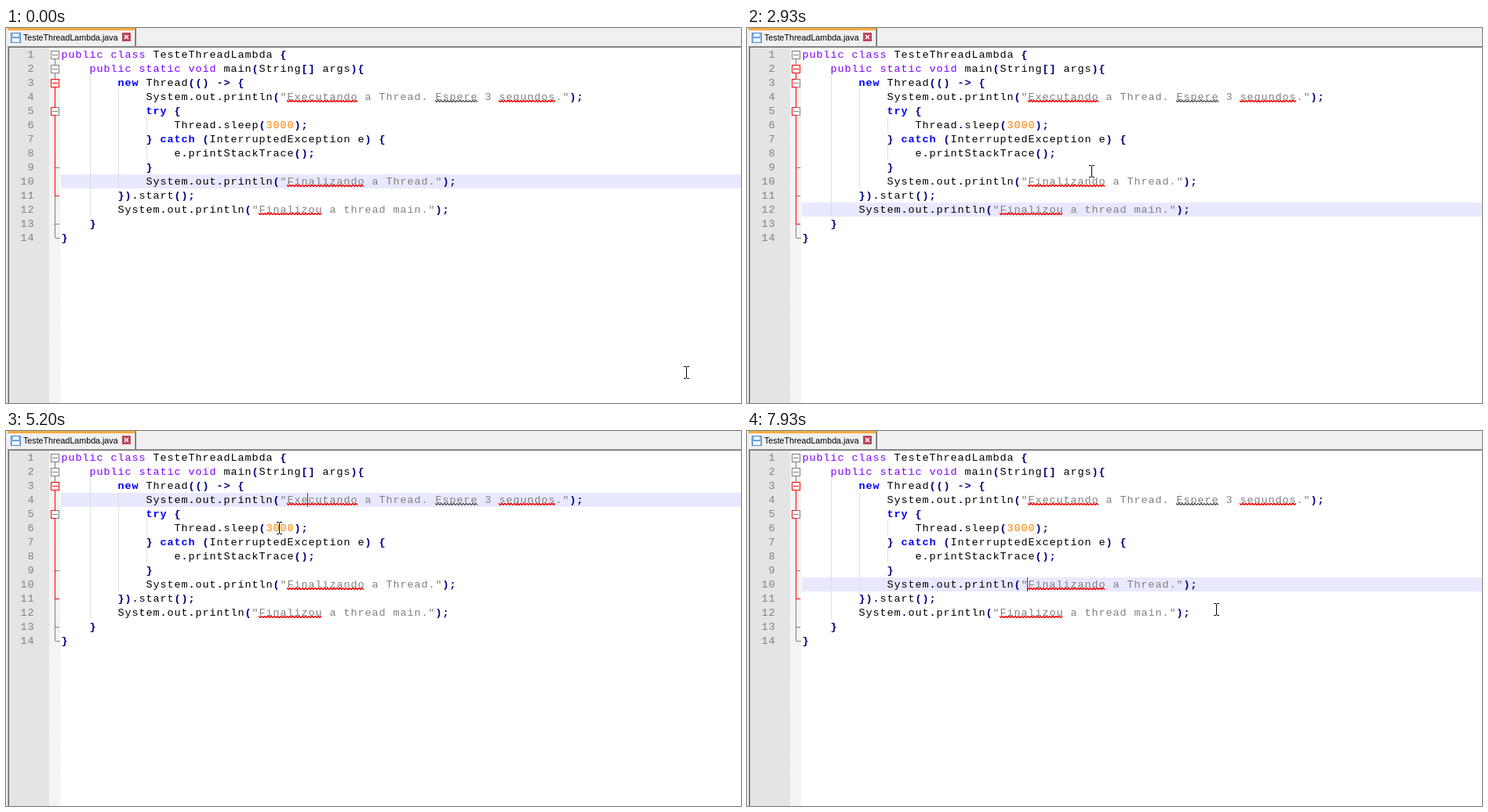
Write an HTML page that moves like this. It is 937x479 px and loops after 8000 ms.

```html
<!DOCTYPE html>
<html lang="pt">
<head>
<meta charset="utf-8">
<title>TesteThreadLambda.java</title>
<style>
html, body { margin: 0; width: 100%; height: 100%; overflow: hidden; background: #fff; }
svg { display: block; width: 937px; height: 479px; }
text { white-space: pre; }
.code { font: 13.5px "Liberation Mono", monospace; letter-spacing: .9px; fill: #000; }
.type { fill: #8000ff; }
.word { fill: #0000ff; font-weight: bold; }
.op { fill: #000080; font-weight: bold; }
.str, .num { fill: #808080; }
.lit { fill: #ff8000; }
.brace { fill: #ff0000; font-weight: bold; }
.tab { font: 10.7px "Liberation Sans", sans-serif; fill: #000; }
.crisp { shape-rendering: crispEdges; }
</style>
</head>
<body>
<svg id="stage" viewBox="0 0 937 479" xmlns="http://www.w3.org/2000/svg">
  <defs>
    <pattern id="check" width="2" height="2" patternUnits="userSpaceOnUse">
      <rect width="2" height="2" fill="#fff"/>
      <path d="M0 0h1v1h1v1h-1v-1h-1z" fill="#e9e9e9"/>
    </pattern>
  </defs>
  <g class="crisp">
    <rect width="937" height="24" fill="#f0f0f0"/>
    <rect width="2" height="479" fill="#f0f0f0"/>
    <rect x="2" width="163" height="3" fill="#faaa3c"/>
    <rect x="164" y="1" width="1" height="22" fill="#a0a0a0"/>
    <rect x="165" width="1" height="23" fill="#696969"/>
    <path d="M2 479V23H937V24H3V479z" fill="#a0a0a0"/>
    <path d="M3 479V24H937V25H4V479z" fill="#696969"/>
    <rect x="4" y="25" width="51" height="454" fill="#e4e4e4"/>
    <rect x="55" y="25" width="14" height="454" fill="url(#check)"/>
    <rect x="6" y="6" width="13" height="13" fill="#4a86cf"/>
    <rect x="7" y="7" width="11" height="11" fill="#8fbdf0"/>
    <rect x="9" y="7" width="7" height="4" fill="#eaf4ff"/>
    <rect x="8" y="12" width="9" height="6" fill="#f4f8fc"/>
    <rect x="8" y="12" width="9" height="1" fill="#4a86cf"/>
    <rect x="148" y="6" width="11" height="11" fill="#b9475a"/>
  </g>
  <path d="M151 9l5 5m0-5l-5 5" stroke="#fff" stroke-width="1.6"/>
  <text class="tab" x="22" y="16">TesteThreadLambda.java</text>
  <g id="back" class="crisp"></g>
  <g id="folds" class="crisp"></g>
  <g id="text" class="code"></g>
  <g id="front"></g>
</svg>
<script>
const LEFT = 70, TOP = 25, ROW = 18, COL = 9, FPS = 15, FRAMES = 120;
const GREY = '#808080', RED = '#ff0000';
const source = `public class TesteThreadLambda {
    public static void main(String[] args){
        new Thread(() -> {
            System.out.println("Executando a Thread. Espere 3 segundos.");
            try {
                Thread.sleep(3000);
            } catch (InterruptedException e) {
                e.printStackTrace();
            }
            System.out.println("Finalizando a Thread.");
        }).start();
        System.out.println("Finalizou a thread main.");
    }
}`.split('\n');

const $ = id => document.getElementById(id);
const rowTop = line => TOP + ROW * (line - 1);
const rowMid = line => rowTop(line) + 9;

function add(parent, tag, attrs, content) {
  const el = document.createElementNS('http://www.w3.org/2000/svg', tag);
  for (const key in attrs) el.setAttribute(key, attrs[key]);
  if (content) el.textContent = content;
  parent.appendChild(el);
  return el;
}
const box = (parent, x, y, width, height, fill) => add(parent, 'rect', { x, y, width, height, fill });
const show = (el, on) => el.setAttribute('visibility', on ? 'visible' : 'hidden');

// current line, indent guides, selection
const bar = box($('back'), LEFT, 0, 937 - LEFT, ROW, '#e8e8ff');
function guide(col, from, to) {
  const x = LEFT + col * COL + 1, y = rowTop(from), end = rowTop(to + 1);
  box($('back'), x, y, 1, end - y, '#fff');
  add($('back'), 'path', { d: `M${x + .5} ${y}V${end}`, stroke: '#c0c0c0', 'stroke-dasharray': '1 1' });
}
guide(4, 3, 12);
guide(8, 4, 10);
guide(12, 6, 6);
guide(12, 8, 8);
const selection = box($('back'), 331, rowTop(6), 36, ROW, '#c0c0c0');

// code text
function kind(word) {
  if (/^"/.test(word)) return 'str';
  if (/^\d/.test(word)) return 'lit';
  if (/^(public|class|static|void)$/.test(word)) return 'type';
  if (/^(new|try|catch)$/.test(word)) return 'word';
  return /^\w/.test(word) ? '' : 'op';
}
const braces = [];
source.forEach((row, i) => {
  const y = rowTop(i + 1) + 13, number = String(i + 1);
  add($('text'), 'text', { x: 36.4 - COL * number.length, y, class: 'num' }, number);
  for (const m of row.matchAll(/"[^"]*"|\w+|[^\s\w]/g)) {
    const el = add($('text'), 'text', { x: LEFT + .4 + m.index * COL, y, class: kind(m[0]) }, m[0]);
    if (i === 5 && /[()]/.test(m[0])) braces.push(el);
  }
});

// spelling marks
function squiggle(line, word, stroke) {
  const x = LEFT + source[line - 1].indexOf(word) * COL, y = rowTop(line) + 13.5;
  let d = `M${x} ${y}`;
  for (let k = 2; k <= word.length * COL; k += 2) d += `L${x + k} ${y + k % 4}`;
  add($('text'), 'path', { d, stroke, fill: 'none', class: 'crisp' });
}
squiggle(4, 'Executando', RED);
squiggle(4, 'Espere', '#666');
squiggle(4, 'segundos', RED);
squiggle(10, 'Finalizando', RED);
squiggle(12, 'Finalizou', RED);

// fold margin: each block runs from its opening line to its closing line
const blocks = [[1, 14], [2, 13], [3, 11], [5, 9]];
box($('folds'), 62, rowMid(1), 1, rowMid(14) - rowMid(1), GREY);
const spine = box($('folds'), 62, 0, 1, 0, RED);
const marks = blocks.map(([head, tail]) => {
  const y = rowMid(head);
  const half = d => add($('folds'), 'path', { d, fill: 'none' });
  const tick = box($('folds'), 63, rowMid(tail), tail === 14 ? 6 : 5, 1, GREY);
  box($('folds'), 57, y - 5, 11, 11, '#fff');
  return {
    head, tail, tick,
    left: half(`M63 ${y - 4.5}H57.5v10H63`),
    right: half(`M63 ${y - 4.5}h4.5v10H63`),
    minus: box($('folds'), 59, y, 7, 1, GREY)
  };
});
// nested blocks keep only the left half of their box in the active colour
function highlight(line) {
  const [from, to] = blocks.filter(b => b[0] <= line && line <= b[1]).pop();
  spine.setAttribute('y', rowMid(from));
  spine.setAttribute('height', rowMid(to) + 1 - rowMid(from));
  for (const m of marks) {
    const tone = m.head === from ? RED : GREY;
    m.left.setAttribute('stroke', m.head >= from ? RED : GREY);
    m.right.setAttribute('stroke', tone);
    m.minus.setAttribute('fill', tone);
    m.tick.setAttribute('fill', tone);
  }
}

const glow = box($('front'), 331, rowTop(6), 36, ROW, 'rgba(0, 255, 0, .39)');
const caret = box($('front'), 0, 0, 1, ROW, '#8000ff');
const beam = add($('front'), 'path', {
  d: 'M-3-8h3v1h1v-1h3v1h-3v14h3v1h-3v-1h-1v1h-3v-1h3v-14h-3z', class: 'crisp'
});
const arrow = add($('front'), 'path', {
  d: 'M.5.5V17L4.3 13.3L7 19L9.3 18L6.8 12.3H12z', fill: '#fff', stroke: '#000'
});

// caret states: start frame, line, caret x, blink start, selected
const states = [
  [0, 10, 0, 0],
  [17, 12, 348, 17],
  [52, 4, 384, 54.5],
  [80, 6, 348, 80],
  [82, 6, 366, 82, true],
  [101, 10, 357, 101]
];
// pointer path: frame, x, y
const path = [
  [0, 867, 440], [4, 740, 385], [8, 480, 275], [11, 358, 220], [13, 348, 224], [23, 348, 224],
  [27, 469, 241], [30, 550, 243], [33, 520, 236], [36, 468, 232], [40, 468, 232],
  [50, 385, 92], [57, 385, 92], [62, 617, 82], [63, 617, 82], [66, 619, 81],
  [69, 580, 90], [73, 430, 112], [76, 355, 123], [78, 348, 124], [86, 348, 124],
  [87, 355, 130], [90, 370, 146], [93, 384, 168], [97, 372, 188], [99, 364, 193],
  [101, 364, 193], [104, 420, 232], [106, 500, 238], [109, 597, 227], [118, 597, 227], [119, 598, 228]
];
function slope(i, axis) {
  const rate = k => (path[k + 1][axis] - path[k][axis]) / (path[k + 1][0] - path[k][0]);
  if (i === 0 || i === path.length - 1) return 0;
  const a = rate(i - 1), b = rate(i);
  return a * b > 0 ? 2 * a * b / (a + b) : 0;
}
function pointer(n, axis) {
  let i = 0;
  while (i < path.length - 2 && path[i + 1][0] <= n) i++;
  const p = path[i], q = path[i + 1], span = q[0] - p[0], u = (n - p[0]) / span;
  const ease = u * u * (3 - 2 * u);
  return Math.round(p[axis] + (q[axis] - p[axis]) * ease +
    span * u * (1 - u) * (slope(i, axis) * (1 - u) - slope(i + 1, axis) * u));
}

function draw(ms) {
  const n = Math.floor(ms * FPS / 1000 + 0.1) % FRAMES;
  const [, line, x, since, selected] = states.filter(s => s[0] <= n).pop();
  const px = pointer(n, 1), py = pointer(n, 2);
  const onSelection = !!selected && n >= 87 && py < 133;

  bar.setAttribute('y', rowTop(line));
  highlight(line);
  show(selection, selected);
  show(glow, selected);
  for (const b of braces) b.setAttribute('class', selected ? 'brace' : 'op');
  caret.setAttribute('x', x);
  caret.setAttribute('y', rowTop(line));
  show(caret, x && Math.floor(Math.max(0, n - since) / 8) % 2 === 0);
  for (const el of [beam, arrow]) el.setAttribute('transform', `translate(${px} ${py})`);
  show(arrow, onSelection);
  show(beam, !onSelection);
}

const start = performance.now();
function tick() {
  draw((performance.now() - start) % 8000);
  requestAnimationFrame(tick);
}
tick();
</script>
</body>
</html>
```
